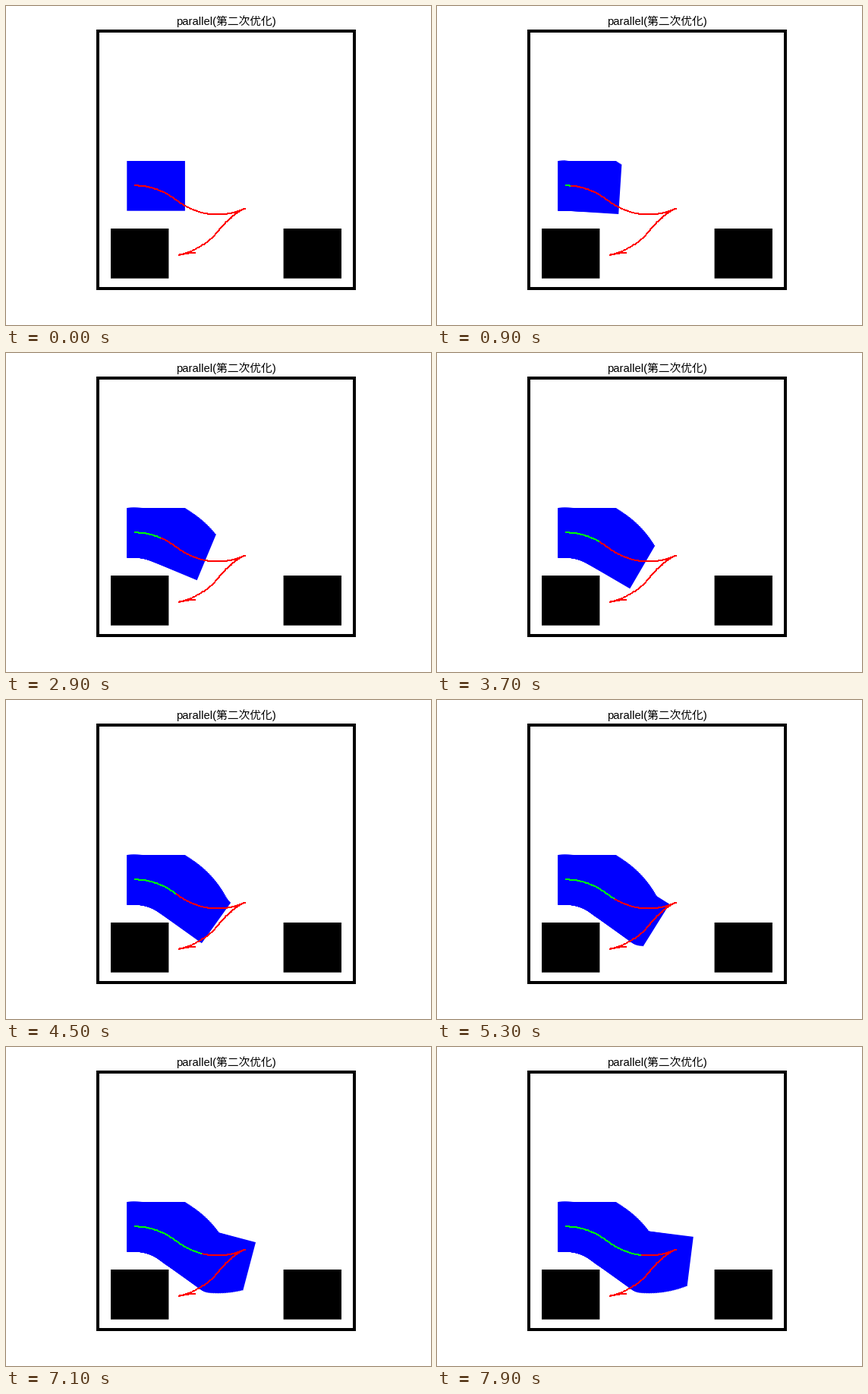
A matplotlib script that plays this animation: 560 by 420 pixels, repeating every 8 s.

```python
import numpy as np
import matplotlib.pyplot as plt
from matplotlib.animation import FuncAnimation
from matplotlib.collections import PolyCollection
from matplotlib.patches import Rectangle

W, H, DPI = 560, 420, 100
PX = 72 / DPI
FRAMES, INTERVAL = 80, 100

# Car geometry (px), measured from the rear axle
REAR, FRONT, HALF = 10.8, 65.8, 32.85
START = (170.1, 236.85)

# Drive profile, in px per step and steps
SPEED, SPEED_UP = 1.45, 10.6
CURVATURE, STEER_TIME, SWITCH = 0.0115, 6.4, 45.9
STEPS, SUB = 112, 10


def drive():
    """Forward leg: poses (x, y, heading) at every step."""
    n = (np.arange(STEPS * SUB) + 0.5) / SUB
    ds = SPEED * np.minimum(n / SPEED_UP, 1) / SUB
    steer = np.clip((SWITCH - n) / STEER_TIME, -1, 1)
    turn = CURVATURE * steer * ds
    mid = np.cumsum(turn) - turn / 2

    def total(d, first):
        return np.concatenate([[first], first + np.cumsum(d)])[::SUB]

    return (total(ds * np.cos(mid), START[0]),
            total(ds * np.sin(mid), START[1]),
            total(turn, 0.0))


def bezier(p0, p1, p2, p3, count=40):
    t = np.linspace(0, 1, count)[:, None]
    p0, p1, p2, p3 = map(np.array, (p0, p1, p2, p3))
    return ((1 - t) ** 3 * p0 + 3 * t * (1 - t) ** 2 * p1
            + 3 * t ** 2 * (1 - t) * p2 + t ** 3 * p3)


def arc(p, a, q, b):
    """Smooth curve from p to q with travel angles a and b in degrees."""
    p, q = np.array(p, float), np.array(q, float)
    reach = np.hypot(*(q - p)) / 3
    a, b = np.radians([a, b])
    return bezier(p, p + reach * np.array([np.cos(a), np.sin(a)]),
                  q - reach * np.array([np.cos(b), np.sin(b)]), q)


def car(x, y, heading):
    c, s = np.cos(heading), np.sin(heading)
    corners = np.array([(-REAR, -HALF), (FRONT, -HALF),
                        (FRONT, HALF), (-REAR, HALF)])
    return corners @ np.array([[c, s], [-s, c]]) + (x, y)


xs, ys, headings = drive()
forward = np.column_stack([xs, ys])
cars = [car(*pose) for pose in zip(xs[:FRAMES], ys[:FRAMES], headings)]
middle, back, parked = (279.5, 297.5), (228.5, 328.3), (249, 325.3)
route = np.vstack([forward,
                   arc(forward[-1], 155, middle, 129),
                   arc(middle, 129, back, 167),
                   arc(back, -13, parked, 0)])

fig = plt.figure(figsize=(W / DPI, H / DPI), dpi=DPI, facecolor="white")
ax = fig.add_axes([0, 0, 1, 1])
ax.set_xlim(0, W)
ax.set_ylim(H, 0)
ax.axis("off")


def box(x0, y0, x1, y1, color):
    ax.add_patch(Rectangle((x0, y0), x1 - x0, y1 - y0, fc=color, ec="none",
                           snap=False, zorder=1))


def trail(points, color, zorder):
    """Crisp one-pixel line: a hairline snapped to pixel centres."""
    line, = ax.plot(*(points - 0.5).T, color=color, lw=0.1 * PX, snap=True,
                    antialiased=False, zorder=zorder)
    return line


box(119, 31, 461, 374, "black")
box(123, 35, 457, 370, "white")
box(138, 293, 214.4, 358.7, "black")
box(365.6, 293, 442, 358.7, "black")
ax.text(289.7, 25, "parallel(第二次优化)", ha="center", va="baseline",
        fontsize=14.8 * PX, family=["Liberation Sans", "Noto Sans CJK JP"])

swept = PolyCollection([], facecolors="blue", edgecolors="none",
                       snap=False, zorder=2)
ax.add_collection(swept, autolim=False)
trail(route, "red", 3)
done = trail(forward[:1], "lime", 4)


def update(i):
    swept.set_verts(cars[:i + 1])
    done.set_data(*(forward[:i + 1] - 0.5).T)
    return swept, done


anim = FuncAnimation(fig, update, frames=FRAMES, interval=INTERVAL,
                     repeat=True, repeat_delay=0)
plt.show()
```
